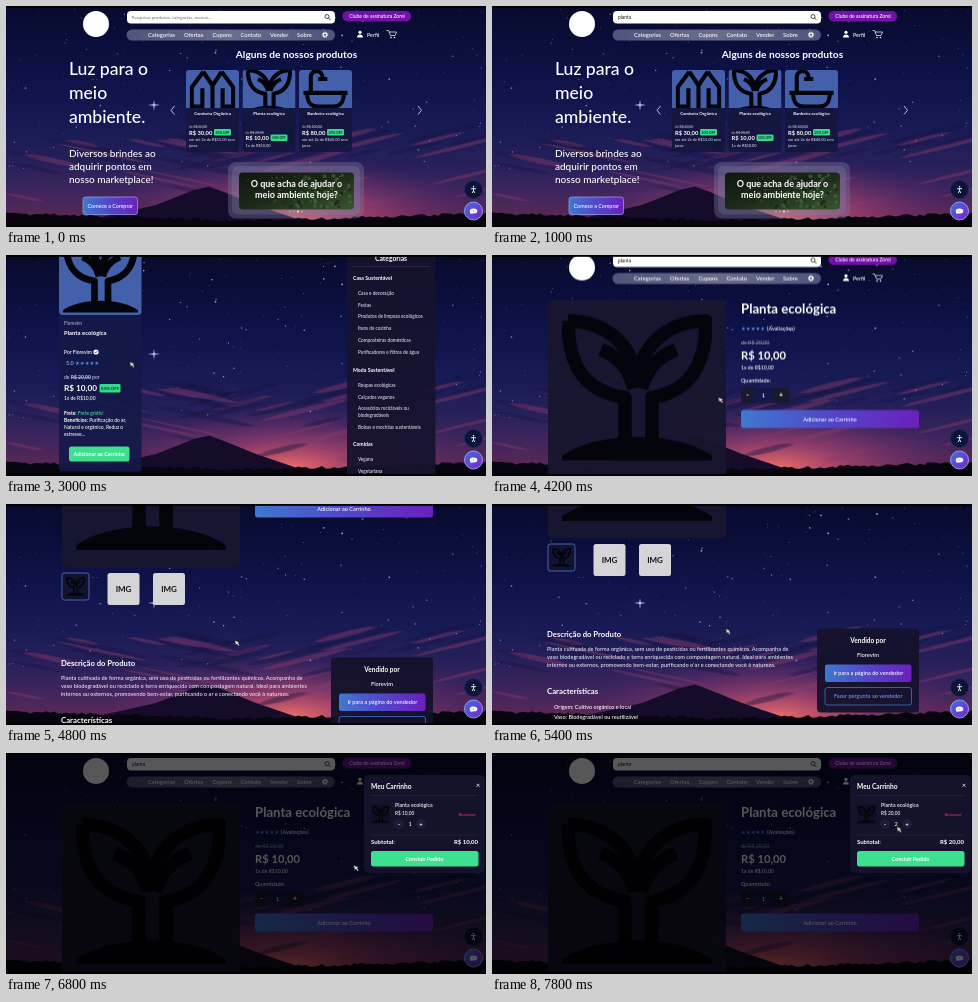
An HTML page for the animation above (8 s loop, 480 by 221 pixels).

```html
<!DOCTYPE html>
<html lang="pt-BR">
<head>
<meta charset="utf-8">
<title>Loja ecológica</title>
<style>
html, body { margin: 0; width: 100%; height: 100%; overflow: hidden; background: #000; }
svg text { font-family: Lato, "Open Sans", sans-serif; font-weight: 500; white-space: pre; fill: #fff; }
#stage { display: block; width: 100vw; height: 100vh; }
svg .bold { font-weight: 700; }
svg .stars { font-family: "DejaVu Sans", sans-serif; }
.strike { text-decoration: line-through; }
.icon { fill: none; stroke: #04040c; stroke-width: 9; stroke-linejoin: round; }
</style>
</head>
<body>
<svg id="stage" viewBox="0 0 480 221" preserveAspectRatio="none"></svg>
<script>
const LOOP = 8000;
const SELLER = 'Florevim';
const rules = [];

// Stepped animation: each [ms, css] pair holds until the next one.
function track(id, frames) {
  const steps = frames.map(([ms, css]) => `${ms / LOOP * 100}%{${css}}`).join('');
  rules.push(`@keyframes ${id}{${steps}} #${id}{animation:${id} ${LOOP}ms step-end infinite}`);
}

function during(id, from, to, content) {
  const frames = [[0, `opacity:${from ? 0 : 1}`]];
  if (from) frames.push([from, 'opacity:1']);
  if (to < LOOP) frames.push([to, 'opacity:0']);
  track(id, frames);
  return `<g id="${id}">${content}</g>`;
}

const text = (x, y, size, str, color = '#fff', attrs = '') =>
  `<text x="${x}" y="${y}" font-size="${size}" style="fill:${color}" ${attrs}>${str}</text>`;
const bold = (x, y, size, str, color, attrs = '') => text(x, y, size, str, color, `class="bold" ${attrs}`);
const MID = 'text-anchor="middle"';
const END = 'text-anchor="end"';
const centered = (x, y, size, str, color) => text(x, y, size, str, color, MID);
const boldCentered = (x, y, size, str, color) => bold(x, y, size, str, color, MID);
const box = (x, y, w, h, r, fill, attrs = '') =>
  `<rect x="${x}" y="${y}" width="${w}" height="${h}" rx="${r}" fill="${fill}" ${attrs}/>`;
const circle = (x, y, r, fill, attrs = '') => `<circle cx="${x}" cy="${y}" r="${r}" fill="${fill}" ${attrs}/>`;
const ellipse = (x, y, rx, ry, fill, attrs = '') =>
  `<ellipse cx="${x}" cy="${y}" rx="${rx}" ry="${ry}" fill="${fill}" ${attrs}/>`;
const shape = (d, fill) => `<path d="${d}" fill="${fill}"/>`;
const line = (d, stroke = '#fff', width = 1) =>
  `<path d="${d}" fill="none" stroke="${stroke}" stroke-width="${width}"/>`;
const stars = (x, y) => text(x, y, 5.4, '★★★★★', '#4f8df0', 'class="stars"');
const badge = (x, y, w, h, str) =>
  box(x, y, w, h, 1.2, '#35d98a') + boldCentered(x + w / 2, y + h * .7, h * .52, str, '#063a2a');

const ICONS = {
  plant: '<path class="icon" d="M4 5C4 36 16 52 42 56V86M4 5C28 5 45 19 50 42C55 19 72 5 96 5C96 36 84 52 60 56V86M26 24C38 29 45 37 48 50M76 24C64 29 56 38 53 50"/>' +
    '<path d="M0 98V95C22 78 78 78 100 95V98Z" fill="#04040c"/>',
  shirt: '<path class="icon" d="M30 8L5 42V84H28M28 44V104M70 8L95 42V84H72M72 44V104M30 8L50 38L70 8M50 38V104"/>',
  bath: '<path class="icon" d="M18 52V20C18 2 44 2 44 22M34 24H54M2 54H98M10 54C10 78 20 84 34 84H66C80 84 90 78 90 54M26 84V96M74 84V96"/>'
};
const icon = (name, x, y, size) =>
  `<svg x="${x}" y="${y}" width="${size}" height="${size}" viewBox="0 0 100 100">${ICONS[name]}</svg>`;

function seeded(seed) {
  return () => (seed = (seed * 16807) % 2147483647) / 2147483647;
}

function sky() {
  const rnd = seeded(77);
  let dots = '';
  for (let i = 0; i < 190; i++) {
    const y = 3 + 165 * rnd() ** 1.2;
    dots += circle((rnd() * 480).toFixed(1), y.toFixed(1), (.3 + rnd() ** 3 * .65).toFixed(2), '#b4c4ff',
      `opacity="${(.35 + rnd() * .6).toFixed(2)}"`);
  }
  let clouds = '';
  for (let i = 0; i < 44; i++) {
    const x = rnd() * 480, y = 125 + rnd() * 80, tilt = x < 200 ? 12 : -14;
    clouds += ellipse(x, y, 15 + rnd() * 35, 1 + rnd() * 1.8, i % 2 ? '#8a3a68' : '#171241',
      `opacity=".45" transform="rotate(${tilt} ${x} ${y})"`);
  }
  let trees = 'M0 221V211';
  for (let x = 0; x <= 480; x += 4) trees += `L${x} ${(216 - 7 * Math.abs(x - 240) / 240 - rnd() * 3).toFixed(1)}`;
  return box(0, 0, 480, 221, 0, 'url(#sky)') + ellipse(285, 212, 190, 62, 'url(#glow)') + dots +
    `<g filter="url(#soft)">${clouds}</g>` +
    shape('M148 94L148.700 98.300L154 99L148.700 99.700L148 105L147.300 99.700L142 99L147.300 98.300Z', '#b9c8ff') +
    shape('M60 218L110 208L150 199L188 184L203 180.500L218 186L250 199L300 216V221H60Z', '#150c2a') +
    shape(trees + 'V221Z', '#08050f');
}

function header() {
  const nav = [['Categorias', 142], ['Ofertas', 178], ['Cupons', 206.5], ['Contato', 234.5], ['Vender', 264], ['Sobre', 291]];
  const typed = ['p', 'pl', 'plan', 'plant', 'planta'].map((word, i, all) =>
    during('typed' + i, 200 + i * 200, i === all.length - 1 ? LOOP : 400 + i * 200,
      text(126, 12.8, 4.8, word, '#222')));
  return circle(90, 18, 13, '#fff') +
    box(121, 5, 208, 12.5, 4, '#fff') +
    during('hint', 0, 200, text(125.5, 12.8, 4.55, 'Pesquisar produtos, categorias, marcas...', '#777')) +
    typed.join('') +
    circle(321, 10.5, 2, 'none', 'stroke="#222" stroke-width=".8"') + line('M322.500 12L324.500 14', '#222', .9) +
    box(120.5, 23.5, 208.5, 11, 5.5, 'url(#bar)') +
    nav.map(([name, x]) => text(x, 31, 5.8, name)).join('') +
    circle(319, 28.8, 1.7, 'none', 'stroke="#fff" stroke-width="1.2"') +
    circle(319, 28.8, 2.7, 'none', 'stroke="#fff" stroke-width=".9" stroke-dasharray="1.2 .92"') +
    box(336.5, 5, 68.5, 10.5, 5, '#7410a8') +
    centered(371, 12, 5, 'Clube de assinatura Zorel') +
    circle(354, 26.3, 1.6, '#fff') + shape('M351 31.500C351 27.500 357 27.500 357 31.500Z', '#fff') +
    text(361, 30.5, 5.4, 'Perfil') +
    line('M380.500 24.500H382.500L384.500 29.500H389L390.500 26H383', '#fff', .7) +
    circle(385, 31.5, .8, '#fff') + circle(388.5, 31.5, .8, '#fff');
}

function homeCard(x, y, name, glyph, full, price, off, notes) {
  return box(x, 64, 53, 82, 3, '#14173f', 'opacity=".9"') +
    `<svg x="${x}" y="64" width="53" height="38" viewBox="0 0 53 38">${box(0, 0, 53, 42, 3, '#4560ab')}${icon(glyph, 3.5, -2, 46)}</svg>` +
    boldCentered(x + 26.5, 109, 4.4, name) +
    text(x + 3, y - 6.5, 3.4, `de <tspan class="strike">R$ ${full}</tspan>`, '#b5b6cc') +
    bold(x + 3, y, 5.8, `R$ ${price}`) + badge(x + 28, y - 5.5, 17, 6.5, `${off}% OFF`) +
    notes.map((note, i) => text(x + 3, y + 6.5 + i * 6, 3.9, note, '#dcdcec')).join('');
}

function home() {
  const title = ['Luz para o', 'meio', 'ambiente.'].map((s, i) => text(63, 68.5 + i * 24, 17.6, s));
  const lead = ['Diversos brindes ao', 'adquirir pontos em', 'nosso marketplace!'].map((s, i) => text(63, 150.5 + i * 13, 10, s));
  const rnd = seeded(12);
  let leaves = '';
  for (let i = 0; i < 90; i++) {
    const across = rnd() ** .7;
    leaves += circle(236 + across * 109, 169 + rnd() * 32, .7 + rnd() * 1.6, i % 3 ? '#4c6b3c' : '#141d12',
      `opacity="${(.2 + across * .5).toFixed(2)}"`);
  }
  return title.join('') + lead.join('') +
    box(77, 191, 54.5, 17.5, 2.5, 'url(#action)', 'stroke="#9aa8f0" stroke-width=".7"') +
    centered(104.3, 202, 5.4, 'Comece a Comprar') +
    boldCentered(290.5, 51.5, 10.2, 'Alguns de nossos produtos') +
    line('M168.500 100L165 104.300L168.500 108.500M412 100L415.500 104.300L412 108.500', '#b8bde0') +
    homeCard(180, 128.5, 'Camiseta Orgânica', 'shirt', '60,00', '30,00', 50, ['em até 2x de R$15,00 sem', 'juros']) +
    homeCard(236.5, 134, 'Planta ecológica', 'plant', '20,00', '10,00', 50, ['1x de R$10,00']) +
    homeCard(293, 128.5, 'Banheira ecológica', 'bath', '100,00', '80,00', 20, ['em até 2x de R$40,00 sem', 'juros']) +
    box(222, 156, 136, 56.5, 8, '#77749a', 'opacity=".4"') +
    box(226, 160, 128, 48.5, 6, '#8a86a8', 'opacity=".25"') +
    box(233, 166.5, 115, 37, 4, 'url(#forest)') + leaves +
    boldCentered(290.5, 181, 9, 'O que acha de ajudar o') +
    boldCentered(290.5, 192.3, 9, 'meio ambiente hoje?') +
    [284, 288, 292, 296].map((x, i) => circle(x, 205.5, .9, i === 2 ? '#fff' : '#a9a9b8')).join('');
}

// Laid out as seen after scrolling by RESULTS_SCROLL.
const RESULTS_SCROLL = 64;
function results() {
  const groups = [
    [25, 'Casa Sustentável', [[40, 'Casa e decoração'], [51.5, 'Festas'], [63.2, 'Produtos de limpeza ecológicos'],
      [75, 'Itens de cozinha'], [87, 'Composteiras domésticas'], [98.5, 'Purificadores e filtros de água']]],
    [117, 'Moda Sustentável', [[131.5, 'Roupas ecológicas'], [143.5, 'Calçados veganos'], [155, 'Acessórios recicláveis ou'],
      [162, 'biodegradáveis'], [174, 'Bolsas e mochilas sustentáveis']]],
    [191, 'Comidas', [[206, 'Vegana'], [218, 'Vegetariana']]]
  ];
  const menu = groups.map(([y, name, items]) => bold(347, y, 5.2, name) +
    items.map(([iy, item]) => text(352, iy, 4.7, item, '#e2e2ee')).join(''));
  return `<g transform="translate(0 ${RESULTS_SCROLL})">` +
    box(53, -22, 82.5, 238.5, 4, '#151a49', 'opacity=".92"') +
    box(53, -22, 82.5, 82, 4, '#4560ab') + icon('plant', 57, -16, 75) +
    text(58, 69.5, 4.7, SELLER, '#a9acc8') +
    bold(58, 80, 5.9, 'Planta ecológica') +
    text(58, 99, 5, `Por ${SELLER}`) +
    circle(90, 97, 2.6, '#fff') + line('M88.800 97L89.700 98L91.300 96', '#151a49', .7) +
    text(60, 109.8, 5.5, '5.0', '#9fb4ff') + stars(69, 109.5) +
    text(58, 124, 5, 'de <tspan class="strike bold">R$ 20,00</tspan> por', '#c9cae0') +
    bold(58, 135.5, 8.2, 'R$ 10,00') + badge(93.5, 129, 21, 8.5, '50% OFF') +
    text(58, 145, 4.9, '1x de R$10,00') +
    text(58, 159.5, 4.9, '<tspan class="bold">Frete:</tspan> <tspan fill="#46e394">Frete grátis!</tspan>') +
    text(58, 167, 4.9, '<tspan class="bold">Benefícios:</tspan> Purificação do ar,') +
    text(58, 174, 4.9, 'Natural e orgânico, Reduz o') + text(58, 181, 4.9, 'estresse...') +
    box(63, 191.5, 60.5, 15, 2.5, '#3de08f') + boldCentered(93.2, 201, 5.3, 'Adicionar ao Carrinho') +
    box(341, -14, 88.5, 300, 4, '#17132f', 'opacity=".95"') +
    boldCentered(385, 6, 6.8, 'Categorias') + line('M347 11.500H424', '#39365a', .5) + menu.join('') + '</g>';
}

function product() {
  const about = ['Planta cultivada de forma orgânica, sem uso de pesticidas ou fertilizantes químicos. Acompanha de',
    'vaso biodegradável ou reciclado e terra enriquecida com compostagem natural. Ideal para ambientes',
    'internos ou externos, promovendo bem-estar, purificando o ar e conectando você à natureza.'];
  const thumb = x => box(x, 40, 32, 32, 2.5, '#d5d5d8') + boldCentered(x + 16, 59.2, 8, 'IMG', '#111');
  return box(56, 50, 178, 178, 4, '#18162f', 'opacity=".96"') + icon('plant', 70, 64, 150) +
    bold(249, 64.3, 13.2, 'Planta ecológica') + stars(249, 81.3) + text(275, 81.3, 5.4, '(Avaliações)') +
    text(249, 95, 5.3, 'de R$ 20,00', '#8f91ad', 'class="strike"') +
    bold(249, 109.5, 11.2, 'R$ 10,00') + text(249, 120, 5.1, '1x de R$10,00') +
    text(249, 133, 5.5, 'Quantidade:') +
    box(249, 138, 48, 15.5, 2, '#10153d', 'opacity=".6"') +
    box(249, 138, 13, 15.5, 2, '#1b192e') + box(281, 138, 16, 15.5, 2, '#1b192e') +
    boldCentered(255.5, 148, 7, '-') + centered(271.5, 148, 6, '1') + boldCentered(289, 148.3, 7, '+') +
    box(249, 160.5, 178, 18, 2.5, 'url(#action)') + centered(338, 171.5, 5.6, 'Adicionar ao Carrinho') +
    '<g transform="translate(0 194)">' +
    box(56, 40, 27, 27, 2.5, '#12132f', 'stroke="#5a78d8" stroke-width=".8"') + icon('plant', 60, 44, 19) +
    thumb(101.5) + thumb(147) +
    bold(55, 133, 7.7, 'Descrição do Produto') +
    about.map((s, i) => text(55, 147 + i * 8, 5.6, s, '#e8e8f4')).join('') +
    bold(55, 190, 7.8, 'Características') +
    text(62, 204.5, 5.5, 'Origem: Cultivo orgânico e local') + text(62, 214.5, 5.5, 'Vaso: Biodegradável ou reutilizável') +
    box(325, 124.5, 102, 84, 4, '#15122d', 'opacity=".95"') +
    boldCentered(376, 139, 6.5, 'Vendido por') + centered(376, 153, 5.8, SELLER) +
    box(333, 160.5, 86.5, 17.5, 2.5, 'url(#action)') + centered(376.3, 171.3, 5.6, 'Ir para a página do vendedor') +
    box(333, 183.5, 86.5, 17.5, 2.5, 'none', 'stroke="#4a7fe0" stroke-width=".7"') +
    centered(376.3, 194.3, 5.6, 'Fazer pergunta ao vendedor', '#6a9cff') + '</g>';
}

function floating() {
  return circle(467.5, 183.5, 9, '#0c1537', 'stroke="#1d2a5c" stroke-width=".7"') +
    circle(467.5, 180.8, .8, '#fff') + line('M465 182.700H470M467.500 182.500V184.500L466.200 187M467.500 184.500L468.800 187', '#fff', .9) +
    circle(467.5, 205, 9, 'url(#chat)', 'stroke="#a9b4ff" stroke-width=".8"') +
    ellipse(467.5, 205, 3.8, 2.5, '#fff') + shape('M464.500 206L464.500 208L467 207Z', '#fff') +
    [466, 467.5, 469].map(x => circle(x, 205, .45, '#5040c0')).join('');
}

function cart() {
  const amount = (count, price) => centered(404, 73, 5.6, count) +
    text(389, 62, 4.8, price) + bold(472, 91.3, 6, price, '#fff', END);
  const round = (x, sign) => circle(x, 71, 4.2, '#1d1b3a', 'stroke="#34325c" stroke-width=".4"') + boldCentered(x, 73, 6, sign);
  return box(0, 0, 480, 221, 0, '#000', 'opacity=".66"') +
    box(358, 22, 121, 98, 5, '#15132b') +
    bold(365, 36, 6.6, 'Meu Carrinho') + line('M470.500 30.800L473.500 33.800M473.500 30.800L470.500 33.800', '#fff', .7) +
    line('M365 42.500H472M365 82H472', '#302e4a', .5) +
    box(365, 52, 19, 19, 2, '#100f22') + icon('plant', 366, 53, 17) +
    text(389, 54, 5.3, 'Planta ecológica') + text(470, 63, 4.5, 'Remover', '#e0307a', END) +
    round(393, '-') + round(415, '+') + bold(365, 91.3, 6, 'Subtotal:') +
    during('one', 0, 7400, amount('1', 'R$ 10,00')) + during('two', 7400, LOOP, amount('2', 'R$ 20,00')) +
    box(365, 98, 107.5, 15.5, 2.5, '#3de08f') + boldCentered(418.5, 107.8, 5.4, 'Concluir Pedido');
}

const stops = list => list.map(([at, color, alpha = 1]) =>
  `<stop offset="${at}" stop-color="${color}" stop-opacity="${alpha}"/>`).join('');
const gradient = (id, direction, ...list) =>
  `<linearGradient id="${id}" x1="0" y1="0" ${direction}>${stops(list)}</linearGradient>`;
const RIGHT = 'x2="1" y2="0"';

document.getElementById('stage').innerHTML = '<defs>' +
  gradient('sky', 'x2="0" y2="1"', [0, '#080a2c'], [.3, '#0d1146'], [.55, '#171a55'], [.72, '#28205a'], [.86, '#43265e'], [.96, '#5a2853'], [1, '#2a1228']) +
  `<radialGradient id="glow">${stops([[0, '#f0706a', .95], [.35, '#b84a70', .7], [1, '#6a2c70', 0]])}</radialGradient>` +
  gradient('bar', RIGHT, [0, '#50547c'], [.5, '#6b6d8c'], [1, '#50547c']) +
  gradient('action', RIGHT, [0, '#3f78cf'], [.5, '#5247c8'], [1, '#6c20bd']) +
  gradient('forest', 'x2="1" y2="1"', [0, '#10160f'], [.5, '#1c2a1a'], [1, '#3a5530']) +
  gradient('chat', 'x2="1" y2="1"', [0, '#3f6fe0'], [1, '#7a24c8']) +
  '<filter id="soft" x="-10%" y="-50%" width="120%" height="200%"><feGaussianBlur stdDeviation="2 .7"/></filter></defs>' +
  sky() +
  `<g id="scroll">${header()}${during('home', 0, 1400, home())}${during('results', 1400, 3600, results())}${during('product', 3600, LOOP, product())}</g>` +
  floating() + during('cart', 6600, LOOP, cart()) +
  during('pointer', 1400, LOOP, '<path id="cursor" d="M-2.500 -3L2.500 -1L1.500 .2L3 2.300L1.500 3.300L0 1.300L-1.500 2.500Z" stroke="#111" stroke-width=".8"/>') +
  box(0, 0, 480, 1.8, 0, '#000') + box(0, 219, 480, 2, 0, '#000');

const scrollTo = ([ms, y]) => [ms, `transform:translate(0,${-y}px)`];
track('scroll', [[0, 0], [1800, 14], [2000, 34], [2200, 54], [2400, RESULTS_SCROLL], [3600, 0], [4200, 5.5],
  [4400, 45], [4600, 110], [4800, 165], [5000, 194], [5600, 120], [5800, 35], [6000, 0]].map(scrollTo));

const moveTo = ([ms, x, y, fill = '#d8d8e0']) => [ms, `transform:translate(${x}px,${y}px);fill:${fill}`];
track('cursor', [[0, 200, 100], [1600, 185, 104], [1800, 160, 108], [2000, 140, 109], [2400, 126, 109.5],
  [3200, 112, 92], [3400, 100, 80], [3600, 130, 95], [3800, 180, 125], [4000, 218, 142], [4200, 228.5, 145],
  [4600, 231, 139], [5000, 236, 127.5], [5600, 250, 138], [5800, 272, 155], [6000, 290, 166],
  [6200, 295, 168, '#e8486e'], [6600, 310, 150], [6800, 350, 115], [7000, 388, 86], [7200, 410, 74],
  [7400, 414, 73], [7600, 407, 76.5]].map(moveTo));

const style = document.createElement('style');
style.textContent = rules.join('\n');
document.head.append(style);
</script>
</body>
</html>
```
